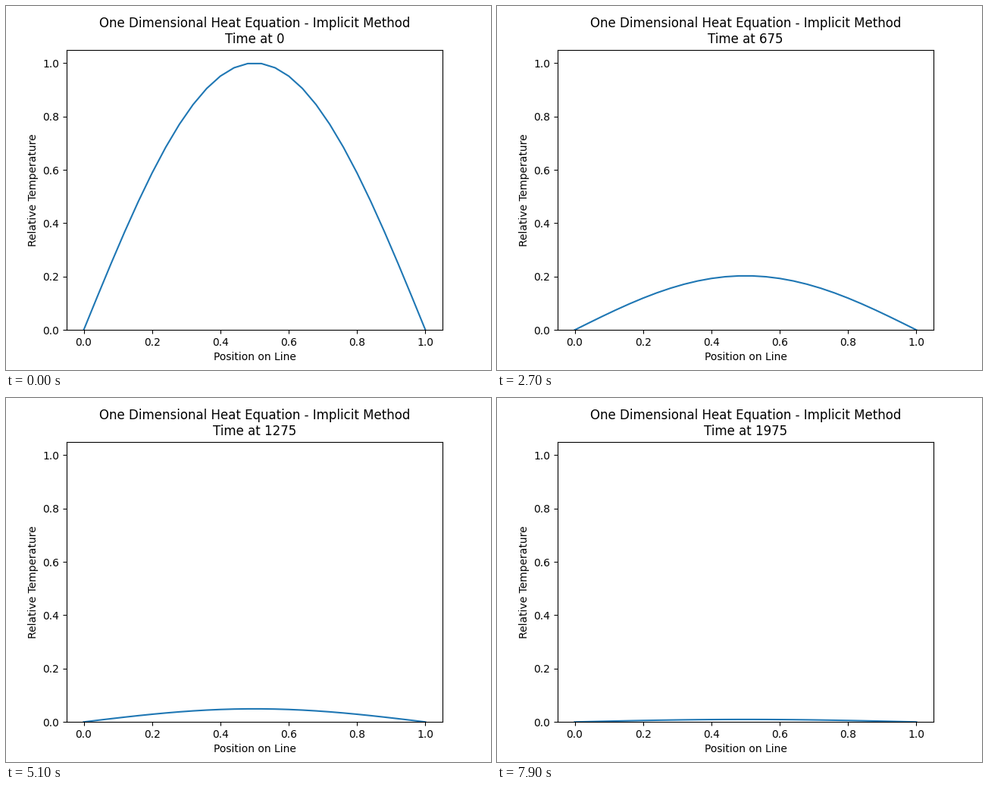
Write a matplotlib script that moves like this. It is 640 by 480 pixels and loops after 8 s.

```python
import matplotlib.pyplot as plt
import numpy as np
from matplotlib.animation import FuncAnimation

FRAMES = 80
INTERVAL = 100        # ms
STEPS_PER_FRAME = 25
CELLS = 25
R = 0.15              # dt / dx**2

x = np.linspace(0, 1, CELLS + 1)
start = np.sin(np.pi * x)

# A sine is an eigenvector of the implicit scheme: every step scales it evenly.
DECAY = 1 / (1 + 4 * R * np.sin(np.pi / (2 * CELLS)) ** 2)


def heading(step):
    return f"One Dimensional Heat Equation - Implicit Method\nTime at {step}"


fig, ax = plt.subplots(figsize=(6.4, 4.8), dpi=100)
line, = ax.plot(x, start, color="#1f77b4", lw=1.5)
ax.set_xlim(-0.05, 1.05)
ax.set_ylim(0, 1.05)
ax.set_xlabel("Position on Line")
ax.set_ylabel("Relative Temperature")
title = ax.set_title(heading(0))


def update(frame):
    step = frame * STEPS_PER_FRAME
    line.set_ydata(start * DECAY ** step)
    title.set_text(heading(step))
    return line, title


anim = FuncAnimation(fig, update, frames=FRAMES, interval=INTERVAL,
                     repeat=True, repeat_delay=0, blit=False)
plt.show()
```
